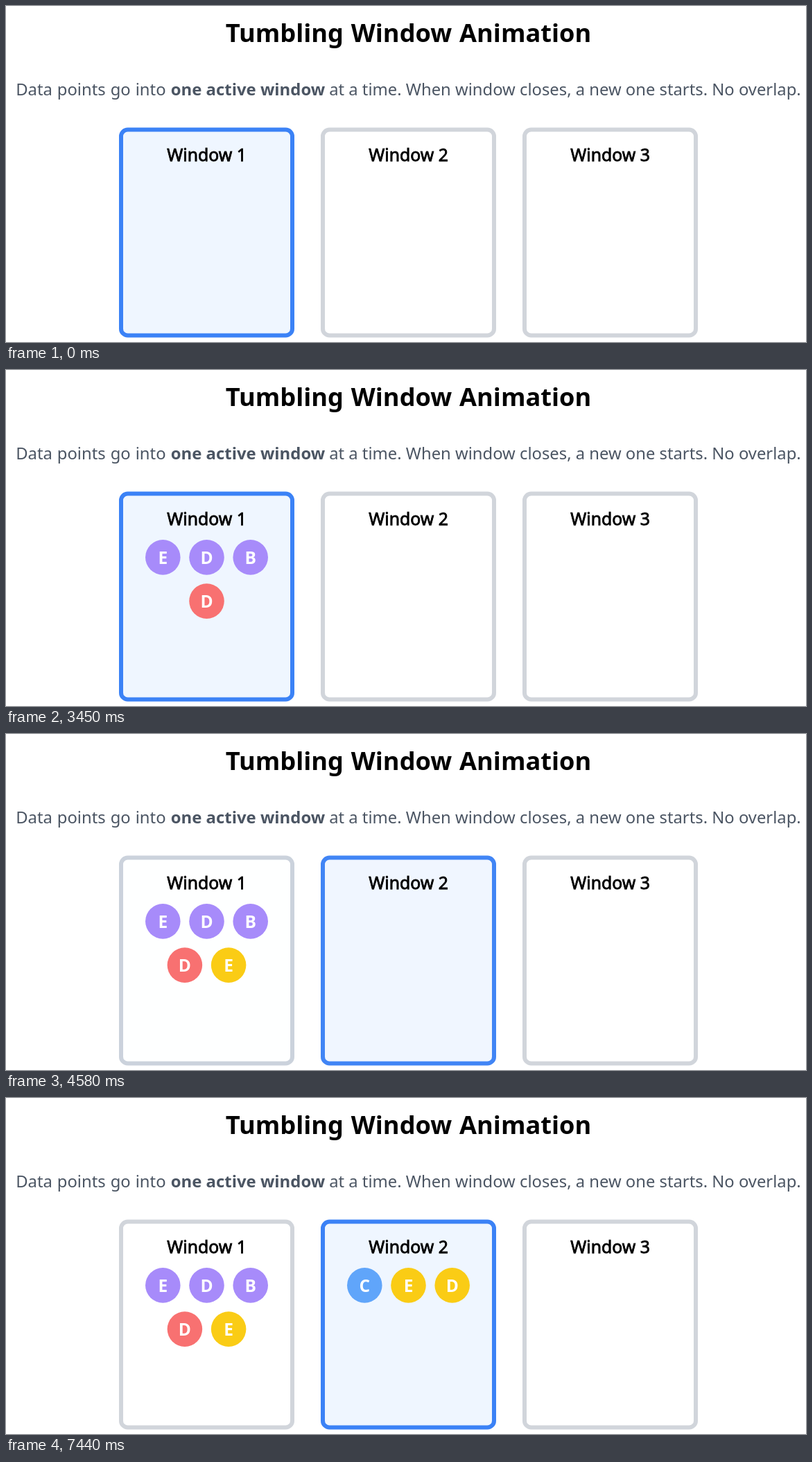
These frames come from a looping animation (1154 px wide and 485 px high, 8 s). An HTML page:

```html
<!DOCTYPE html>
<html lang="en">
<head>
<meta charset="utf-8">
<title>Tumbling Window Animation</title>
<style>
html, body { margin: 0; width: 100%; height: 100%; overflow: hidden; background: #fff; }
svg { display: block; width: 1154px; height: 485px; font-family: "Noto Sans", "Open Sans", sans-serif; }
text { white-space: pre; }
.title { font-size: 36.2px; font-weight: 700; word-spacing: 1.5px; text-anchor: middle; }
.note { font-size: 23.8px; fill: #4b5563; }
.note .lead { word-spacing: 0.8px; }
.note .strong { font-size: 23.9px; font-weight: 700; text-anchor: middle; }
/* a thin outline gives the semibold weight */
.label { font-size: 24.8px; stroke: #000; stroke-width: 0.8px; text-anchor: middle; }
.box { --on: 0%; stroke-width: 6px;
  fill: color-mix(in srgb, #eff6ff var(--on), #fff);
  stroke: color-mix(in srgb, #3b82f6 var(--on), #d1d5db); }
.dot text { font-size: 24.5px; font-weight: 700; fill: #fff; text-anchor: middle; }
.purple { fill: #a78bfa; }
.red { fill: #f87171; }
.yellow { fill: #facc15; }
.blue { fill: #60a5fa; }

.box, .dot, .row { animation: 8s step-end infinite; }
.closing { animation-name: closing; }
.opening { animation-name: opening; }

/* the active state eases from one window to the next in four steps */
@keyframes closing {
  0% { --on: 100%; } 55.5% { --on: 95%; } 56.375% { --on: 28%; }
  57.25% { --on: 4%; } 58.125%, 100% { --on: 0%; }
}
@keyframes opening {
  0% { --on: 0%; } 55.5% { --on: 5%; } 56.375% { --on: 72%; }
  57.25% { --on: 96%; } 58.125%, 100% { --on: 100%; }
}

/* arrivals */
@keyframes in1 { 0% { opacity: 0; } 6.25%, 100% { opacity: 1; } }
@keyframes in2 { 0% { opacity: 0; } 18.25%, 100% { opacity: 1; } }
@keyframes in3 { 0% { opacity: 0; } 30.75%, 100% { opacity: 1; } }
@keyframes in4 { 0% { opacity: 0; } 43.125%, 100% { opacity: 1; } }
@keyframes in5 { 0% { opacity: 0; } 55.5%, 100% { opacity: 1; } }
@keyframes in6 { 0% { opacity: 0; } 68.25%, 100% { opacity: 1; } }
@keyframes in7 { 0% { opacity: 0; } 80.625%, 100% { opacity: 1; } }
@keyframes in8 { 0% { opacity: 0; } 93%, 100% { opacity: 1; } }

/* each row recentres by half a pitch when a dot joins */
@keyframes rowA {
  0% { transform: translateX(0); } 18.25% { transform: translateX(-31.6px); }
  30.75%, 100% { transform: translateX(-63.2px); }
}
@keyframes rowB {
  0% { transform: translateX(0); } 55.5%, 100% { transform: translateX(-31.6px); }
}
@keyframes rowC {
  0% { transform: translateX(0); } 80.625% { transform: translateX(-31.6px); }
  93%, 100% { transform: translateX(-63.2px); }
}
</style>
</head>
<body>
<svg width="1154" height="485">
  <defs>
    <rect id="frame" x="-123.5" y="178.5" width="247" height="297" rx="9.6"/>
    <circle id="disc" r="25.28"/>
  </defs>

  <text class="title" x="580.5" y="52">Tumbling Window Animation</text>
  <g class="note">
    <text class="lead" x="14.2" y="129">Data points go into</text>
    <text class="strong" x="349" y="129">one active window</text>
    <text x="466.2" y="129">at a time. When window closes, a new one starts. No overlap.</text>
  </g>

  <g transform="translate(289.5 0)">
    <use href="#frame" class="box closing"/>
    <text class="label" y="224">Window 1</text>
    <g transform="translate(0 270.4)">
      <g class="row" style="animation-name: rowA">
        <g class="dot" style="animation-name: in1"><use href="#disc" class="purple"/><text y="9.6">E</text></g>
        <g transform="translate(63.2 0)">
          <g class="dot" style="animation-name: in2"><use href="#disc" class="purple"/><text y="9.6">D</text></g>
        </g>
        <g transform="translate(126.4 0)">
          <g class="dot" style="animation-name: in3"><use href="#disc" class="purple"/><text y="9.6">B</text></g>
        </g>
      </g>
    </g>
    <g transform="translate(0 333.6)">
      <g class="row" style="animation-name: rowB">
        <g class="dot" style="animation-name: in4"><use href="#disc" class="red"/><text y="9.6">D</text></g>
        <g transform="translate(63.2 0)">
          <g class="dot" style="animation-name: in5"><use href="#disc" class="yellow"/><text y="9.6">E</text></g>
        </g>
      </g>
    </g>
  </g>

  <g transform="translate(580.5 0)">
    <use href="#frame" class="box opening"/>
    <text class="label" y="224">Window 2</text>
    <g transform="translate(0 270.4)">
      <g class="row" style="animation-name: rowC">
        <g class="dot" style="animation-name: in6"><use href="#disc" class="blue"/><text y="9.6">C</text></g>
        <g transform="translate(63.2 0)">
          <g class="dot" style="animation-name: in7"><use href="#disc" class="yellow"/><text y="9.6">E</text></g>
        </g>
        <g transform="translate(126.4 0)">
          <g class="dot" style="animation-name: in8"><use href="#disc" class="yellow"/><text y="9.6">D</text></g>
        </g>
      </g>
    </g>
  </g>

  <g transform="translate(871.5 0)">
    <use href="#frame" class="box"/>
    <text class="label" y="224">Window 3</text>
  </g>
</svg>
</body>
</html>
```
